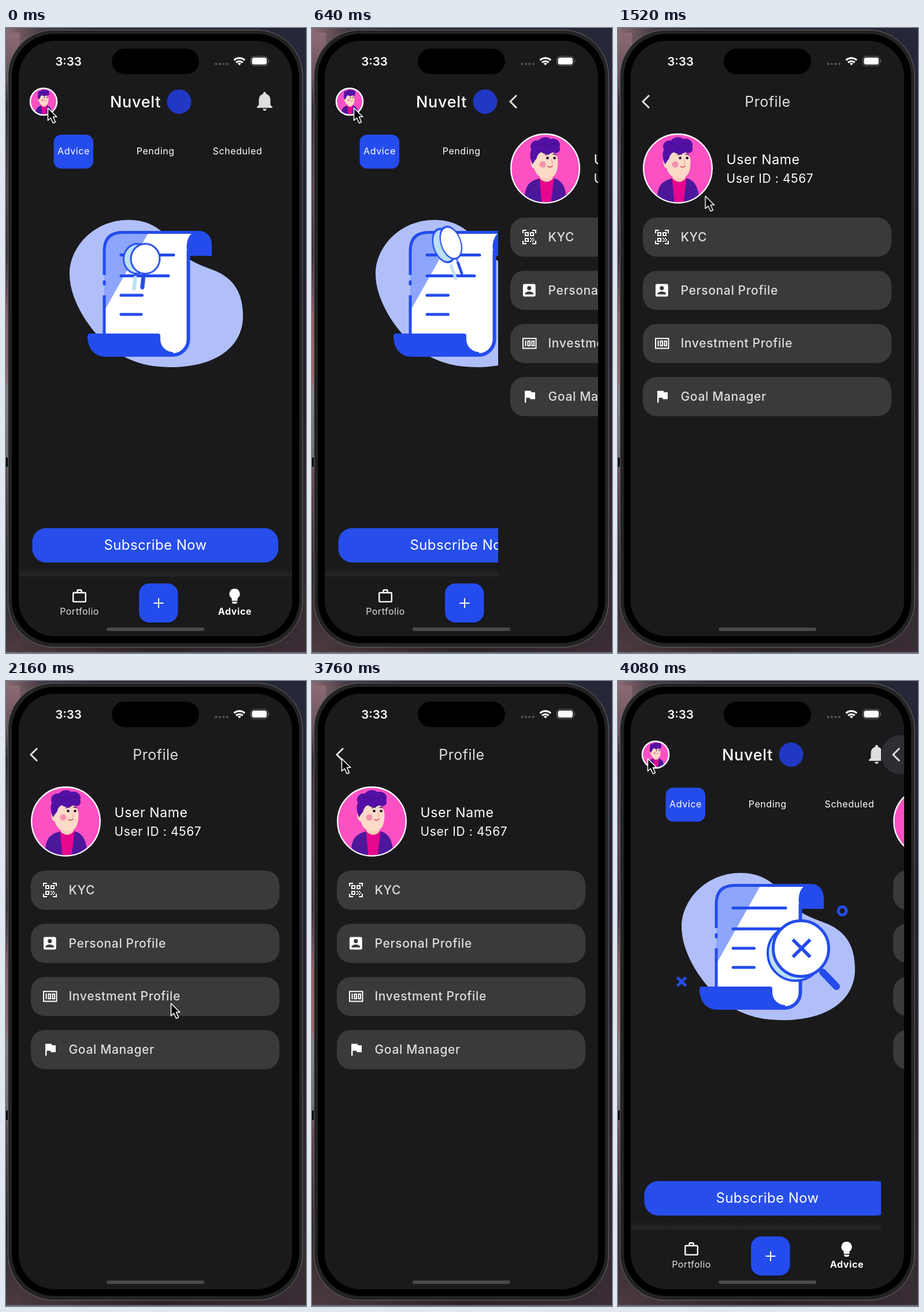
An HTML page without scripts that plays this animation: 519 px wide and 1078 px high, repeating every 4.16 s.

```html
<!DOCTYPE html>
<html lang="en">
<head>
<meta charset="utf-8">
<title>Profile screen</title>
<style>
  html, body { margin: 0; width: 100%; height: 100%; overflow: hidden; background: #1d1a20; }
  svg { display: block; width: 100vw; height: 100vh; }
  text { font-family: Inter, Roboto, "Liberation Sans", sans-serif; fill: #fff; }
  .mid { text-anchor: middle; }
  .tab { font-size: 16px; letter-spacing: .6px; }
  .item { font-size: 21px; font-weight: 500; letter-spacing: .65px; fill: #dedede; }
  .ink { fill: none; stroke: #244cec; stroke-width: 5; stroke-linecap: round; }
  .thin { fill: none; stroke: #fff; stroke-width: 2; }

  .page, .splash, .lens, .search, .found, .pointer, .last {
    animation: 4160ms infinite step-end;
  }
  .page { animation-name: slide; }
  .splash, .found { animation-name: show; opacity: 0; }
  .search { animation-name: hide; }
  .front { animation-name: front; }
  .back { animation-name: back; }
  .pointer { animation-name: move; }
  .last { animation-name: grow; stroke-dasharray: 40 60; }

  @keyframes slide {
    0% { transform: translateX(480px); }
    15.384% { transform: translateX(300px); }
    17.307% { transform: translateX(110px); }
    19.23% { transform: translateX(25px); }
    21.153% { transform: none; }
    96.153% { transform: translateX(235px); }
    98.076%, 100% { transform: translateX(433px); }
  }
  @keyframes show {
    0% { opacity: 0; }
    96.153%, 100% { opacity: 1; }
  }
  @keyframes hide {
    0% { opacity: 1; }
    96.153%, 100% { opacity: 0; }
  }
  @keyframes front {
    0% { transform: translate(241px, 398px) rotate(6deg) scale(1, 1.03); animation-timing-function: steps(6); }
    11.538% { transform: translate(240.5px, 373.5px) rotate(-16deg) scale(.73, 1.13); animation-timing-function: steps(5); }
    21.153%, 100% { transform: translate(240px, 366px) rotate(-25deg) scale(.6, 1.18); }
  }
  @keyframes back {
    0% { transform: translate(227px, 398px) rotate(6deg) scale(.94, 1.03); animation-timing-function: steps(6); }
    11.538% { transform: translate(228.5px, 378px) rotate(-16deg) scale(.76, 1.17); animation-timing-function: steps(5); }
    21.153%, 100% { transform: translate(228px, 371px) rotate(-25deg) scale(.64, 1.22); }
  }
  @keyframes grow {
    0% { stroke-dashoffset: 5px; animation-timing-function: steps(3); }
    5.769%, 100% { stroke-dashoffset: 0; }
  }
  @keyframes move {
    0% { transform: translate(72px, 137px); }
    28.846% { transform: translate(72px, 137px); animation-timing-function: steps(6); }
    40.384% { transform: translate(190px, 365px); animation-timing-function: steps(6); }
    51.923% { transform: translate(285px, 555px); animation-timing-function: steps(3); }
    57.692% { transform: translate(278px, 590px); animation-timing-function: steps(8); }
    73.076% { transform: translate(58px, 144px); animation-timing-function: steps(3); }
    78.846%, 100% { transform: translate(51px, 133px); }
  }
</style>
</head>
<body>
<svg viewBox="0 0 519 1078" preserveAspectRatio="none">
  <defs>
    <linearGradient id="wallLeft" x2="0" y2="1">
      <stop offset="0" stop-color="#8b6a73"/>
      <stop offset=".07" stop-color="#6d525b"/>
      <stop offset=".12" stop-color="#2f272e"/>
      <stop offset=".25" stop-color="#5b4049"/>
      <stop offset=".36" stop-color="#3c2a31"/>
      <stop offset=".46" stop-color="#955f66"/>
      <stop offset=".56" stop-color="#a0666b"/>
      <stop offset=".58" stop-color="#8a8488"/>
      <stop offset=".68" stop-color="#77717a"/>
      <stop offset=".72" stop-color="#6a474f"/>
      <stop offset=".88" stop-color="#2c242a"/>
      <stop offset="1" stop-color="#4b3a40"/>
    </linearGradient>
    <linearGradient id="wallRight" x2="0" y2="1">
      <stop offset="0" stop-color="#262738"/>
      <stop offset=".3" stop-color="#1f2030"/>
      <stop offset=".6" stop-color="#262029"/>
      <stop offset="1" stop-color="#3a2d35"/>
    </linearGradient>
    <linearGradient id="wallTop">
      <stop offset="0" stop-color="#8b6a73"/>
      <stop offset=".12" stop-color="#443a42"/>
      <stop offset=".3" stop-color="#27262b"/>
      <stop offset="1" stop-color="#262738"/>
    </linearGradient>
    <linearGradient id="wallBottom">
      <stop offset="0" stop-color="#4b3a40"/>
      <stop offset=".5" stop-color="#2a2127"/>
      <stop offset="1" stop-color="#3a2d35"/>
    </linearGradient>
    <linearGradient id="lift" x2="0" y2="1">
      <stop offset="0" stop-color="#1a1a1c"/>
      <stop offset="1" stop-color="#262628"/>
    </linearGradient>
    <clipPath id="screen"><rect x="22" y="22" width="473" height="1027" rx="63"/></clipPath>
    <clipPath id="round"><circle r="59"/></clipPath>

    <g id="avatar">
      <g clip-path="url(#round)">
        <circle r="60" fill="#fc50c3"/>
        <path d="M-36 60C-36 32-31 23-10 17H16C32 22 36 36 38 60Z" fill="#4c179b"/>
        <path d="M-10 17H15L10 60H-6Z" fill="#e5078e"/>
        <path d="M-9 8H13V18Q3 28-9 18Z" fill="#f9cdb8"/>
        <path d="M-23-20Q-22-30 0-30Q22-30 22-12C22 8 16 17 3 17C-10 17-17 9-19 0C-25-1-27-12-23-20Z" fill="#fcdac8"/>
        <path d="M-22-7C-27-18-27-28-24-32C-29-42-20-50-12-48C-6-56 5-55 9-51C19-54 28-46 25-37C28-28 19-24 13-28C6-23-2-24-6-28C-11-27-14-23-15-17Q-18-14-22-7Z" fill="#5410a5"/>
        <path d="M-15-40q6-6 12 0t12 0 12 0" fill="none" stroke="#45108f" stroke-width="2"/>
        <circle cx="-4.500" cy="-7" r="5.500" fill="#f391ad"/>
        <g fill="#24123c"><circle cx="4" cy="-18" r="2.300"/><circle cx="16" cy="-18" r="2.300"/></g>
        <path d="M0-23q4-3 7-1M13-24q4-2 6 1" fill="none" stroke="#35105f" stroke-width="1.500"/>
        <path d="M10-16l3 7-3 1" fill="none" stroke="#eba995" stroke-width="1.200"/>
        <path d="M4-4q5 4 9-1" fill="none" stroke="#d34a5f" stroke-width="1.600"/>
      </g>
    </g>
    <path id="cross" d="M-1-1 1 1M1-1-1 1" vector-effect="non-scaling-stroke"/>
    <rect id="card" x="43" width="430" height="67.500" rx="24" fill="#3a3a3b"/>
  </defs>

  <!-- wallpaper and phone body -->
  <rect width="519" height="540" fill="url(#wallTop)"/>
  <rect y="540" width="519" height="538" fill="url(#wallBottom)"/>
  <rect y="8" width="24" height="1062" fill="url(#wallLeft)"/>
  <rect x="495" y="8" width="24" height="1062" fill="url(#wallRight)"/>
  <path d="M0 741h3v16H0z"/>
  <rect y="1076.500" width="519" height="1.500" fill="#77737a"/>
  <rect x="3.500" y="3.500" width="509.500" height="1064.500" rx="79" fill="#232324" stroke="#6c6c6d"/>
  <rect x="10" y="10" width="497" height="1051" rx="74"/>
  <rect x="22" y="22" width="473" height="1027" rx="63" fill="#1a1a1c"/>

  <g clip-path="url(#screen)">
    <!-- advice page -->
    <use href="#avatar" transform="translate(65 127) scale(.39)"/>
    <circle cx="65" cy="127" r="23" fill="none" stroke="#fff" stroke-width="2.500"/>
    <text class="mid" x="224" y="136.500" font-size="27" font-weight="500" letter-spacing=".7">Nuvelt</text>
    <circle cx="299.500" cy="127" r="21" fill="#2138c4"/>
    <path transform="translate(427.400 106) scale(1.670)" fill="#dedede" d="M12 22c1.100 0 2-.9 2-2h-4c0 1.100.9 2 2 2zm6-6v-5c0-3.070-1.640-5.640-4.500-6.320V4c0-.83-.67-1.500-1.500-1.500s-1.500.67-1.500 1.500v.68C7.630 5.360 6 7.920 6 11v5l-2 2v1h16v-1l-2-2z"/>

    <rect x="82.500" y="184" width="68.500" height="58.500" rx="13" fill="#244cec"/>
    <text class="tab mid" x="117" y="218">Advice</text>
    <text class="tab mid" x="258.700" y="218">Pending</text>
    <text class="tab mid" x="400.500" y="218">Scheduled</text>

    <!-- scroll illustration -->
    <path fill="#b1bff9" d="M212 331C152 331 110 378 110 424C110 468 142 516 170 542C202 572 238 585 285 585C364 585 410 549 410 497C410 458 395 432 360 418C342 411 318 404 300 385C280 362 262 331 212 331Z"/>
    <path fill="#fff" d="M170 384Q170 352 202 352H335Q316 354 316 380V537A27 27 0 0 1 289 564H260V527H170Z"/>
    <path fill="#8da5fb" d="M170 384Q170 352 202 352H247L170 488Z"/>
    <path class="ink" style="stroke-linecap:butt" d="M170 426V384Q170 352.500 202 352.500H335M170 461V530"/>
    <path class="ink" d="M170 437.500v4"/>
    <path class="ink" style="stroke-width:6" d="M315.500 385V537A27 27 0 0 1 288.500 564"/>
    <path fill="#244cec" d="M312.500 380C312.500 362 320 350 334 350C348 350 356 361 356 374V393H317ZM145 527H263Q267 527 267 531V537A22 22 0 0 0 289 559V567H173C152 567 141 551 141 532Q141 527 145 527Z"/>
    <path class="ink" d="M199 391.500h91M199 427.500h82M199 461h36.500"/>
    <path class="ink last" d="M199 494h36.500"/>

    <!-- small spinning magnifier -->
    <g class="search">
      <g class="lens back">
        <path d="M0 32V50" stroke="#bce0f3" stroke-width="7" stroke-linecap="round"/>
        <circle r="25" fill="#bce0f3" stroke="#244cec" stroke-width="3"/>
      </g>
      <g class="lens front">
        <path d="M0 26V34" stroke="#244cec" stroke-width="3"/>
        <path d="M0 33V48" stroke="#244cec" stroke-width="7" stroke-linecap="round"/>
        <circle r="25" fill="#fff" stroke="#244cec" stroke-width="3"/>
      </g>
    </g>

    <!-- settled magnifier -->
    <g class="found">
      <circle class="ink" cx="307" cy="469" r="48" style="fill:#bce0f3;stroke-width:4"/>
      <path class="ink" d="M348 494l8 8"/>
      <path class="ink" style="stroke-width:12" d="M354 502l24 25"/>
      <circle class="ink" cx="316.500" cy="461.500" r="48" style="fill:#fff"/>
      <use class="ink" href="#cross" style="stroke-width:6;stroke-linecap:butt" transform="translate(317.500 461) scale(15)"/>
      <use class="ink" href="#cross" style="stroke-linecap:butt" transform="translate(110 518.500) scale(7.500)"/>
      <circle class="ink" cx="388" cy="396.500" r="7"/>
    </g>

    <rect x="45.500" y="862.500" width="425.500" height="59.500" rx="24" fill="#274eeb"/>
    <text class="mid" x="258.500" y="900" font-size="24" letter-spacing=".4">Subscribe Now</text>

    <!-- bottom navigation -->
    <rect x="22" y="932" width="473" height="14" fill="url(#lift)"/>
    <rect x="22" y="946" width="473" height="104" fill="#1a1a1c"/>
    <path transform="translate(112.600 965.600) scale(1.200)" fill="#fff" d="M14 6V4h-4v2h4zM4 8v11h16V8H4zm16-2c1.110 0 2 .89 2 2v11c0 1.110-.89 2-2 2H4c-1.110 0-2-.89-2-2V8c0-1.110.89-2 2-2h4V4c0-1.110.89-2 2-2h4c1.110 0 2 .89 2 2v2h4z"/>
    <text class="tab mid" x="127" y="1012" style="fill:#dedede;letter-spacing:.5px">Portfolio</text>
    <rect x="229" y="960" width="69" height="68" rx="19" fill="#131315"/>
    <rect x="230" y="958" width="67.500" height="67.500" rx="18" fill="#244cec"/>
    <path class="thin" d="M255.500 992h17M264 983.500v17"/>
    <path fill="#fff" d="M395.500 967a9 9 0 0 1 5 16.500v4.500h-10v-4.500a9 9 0 0 1 5-16.500zM391 989.500h9v1.500q-1 2-3 2h-3q-2 0-3-2z"/>
    <text class="tab mid" x="396" y="1012" font-weight="700">Advice</text>

    <!-- profile page -->
    <g class="page">
      <rect x="22" y="22" width="473" height="1027" fill="#1a1a1c"/>
      <circle class="splash" cx="55.500" cy="127" r="33.500" fill="#2f2d34"/>
      <path d="M54 116 43 127l11 11" fill="none" stroke="#dedede" stroke-width="3"/>
      <text class="mid" x="259" y="136" font-size="25" letter-spacing=".5" style="fill:#dedede">Profile</text>
      <use href="#avatar" x="103.500" y="242.300"/>
      <circle cx="103.500" cy="242.300" r="59.300" fill="none" stroke="#fff" stroke-width="2.300"/>
      <text x="187.500" y="235" font-size="23" letter-spacing=".6">User Name</text>
      <text x="187.500" y="267" font-size="21" letter-spacing=".6">User ID : 4567</text>

      <use href="#card" y="327"/>
      <use href="#card" y="418.700"/>
      <use href="#card" y="510.400"/>
      <use href="#card" y="602"/>
      <text class="item" x="108.500" y="368">KYC</text>
      <text class="item" x="108.500" y="459.700">Personal Profile</text>
      <text class="item" x="108.500" y="551.300">Investment Profile</text>
      <text class="item" x="108.500" y="643">Goal Manager</text>

      <g class="thin">
        <path d="M65 354v-5h6M81 349h6v5M65 367v5h6M81 372h6v-5"/>
        <path d="M69 353h5v5h-5zM78 353h5v5h-5zM69 363h5v5h-5z"/>
        <path stroke-dasharray="2 2" d="M77 363h7M79 365.500h7M77 368h7"/>
      </g>
      <path transform="translate(61.300 437.800) scale(1.210)" fill="#fff" fill-rule="evenodd" d="M3 5v14c0 1.100.9 2 2 2h14c1.100 0 2-.9 2-2V5c0-1.100-.9-2-2-2H5c-1.100 0-2 .9-2 2zm12 4c0 1.660-1.340 3-3 3s-3-1.340-3-3 1.340-3 3-3 3 1.340 3 3zm-9 8c0-2 4-3.100 6-3.100s6 1.100 6 3.100v1H6v-1z"/>
      <path class="thin" d="M65 535.500h22.500v17H65zM69.500 539v10M73.500 540h3.500v8h-3.500zM80.500 540h3.500v8h-3.500z"/>
      <path transform="translate(62 621) scale(1.200)" fill="#fff" d="M14.400 6 14 4H5v17h2v-7h5.600l.4 2h7V6z"/>
    </g>
  </g>

  <!-- system overlay -->
  <rect x="183" y="35.500" width="151" height="44" rx="22"/>
  <text class="mid" x="108" y="64.500" font-size="20.500" font-weight="600">3:33</text>
  <path d="M363.500 62h22" stroke="#555557" stroke-width="4.200" stroke-linecap="round" stroke-dasharray="0 6.400"/>
  <g fill="none" stroke="#fff" stroke-width="3.200">
    <path d="M394.500 55.500a13.500 13.500 0 0 1 18.500 0M398 59.500a8.500 8.500 0 0 1 11.500 0"/>
    <path d="M400.800 61.300q3-2.400 6 0l-3 3.300z" fill="#fff" stroke="none"/>
  </g>
  <rect x="423.500" y="49" width="29.500" height="16" rx="5" fill="none" stroke="#77777a"/>
  <rect x="425.500" y="51" width="25.500" height="12" rx="3.500" fill="#fff"/>
  <path d="M454.500 54.500q2 2.500 0 5z" fill="#77777a"/>
  <rect x="174" y="1034" width="169" height="6" rx="3" fill="#49494b"/>

  <path class="pointer" d="M.5 1V22.500L5.300 18 9.500 27 13.500 25.200 9.500 16.200H15.800Z" stroke="#fff" stroke-width="1.600" stroke-linejoin="round"/>
</svg>
</body>
</html>
```
